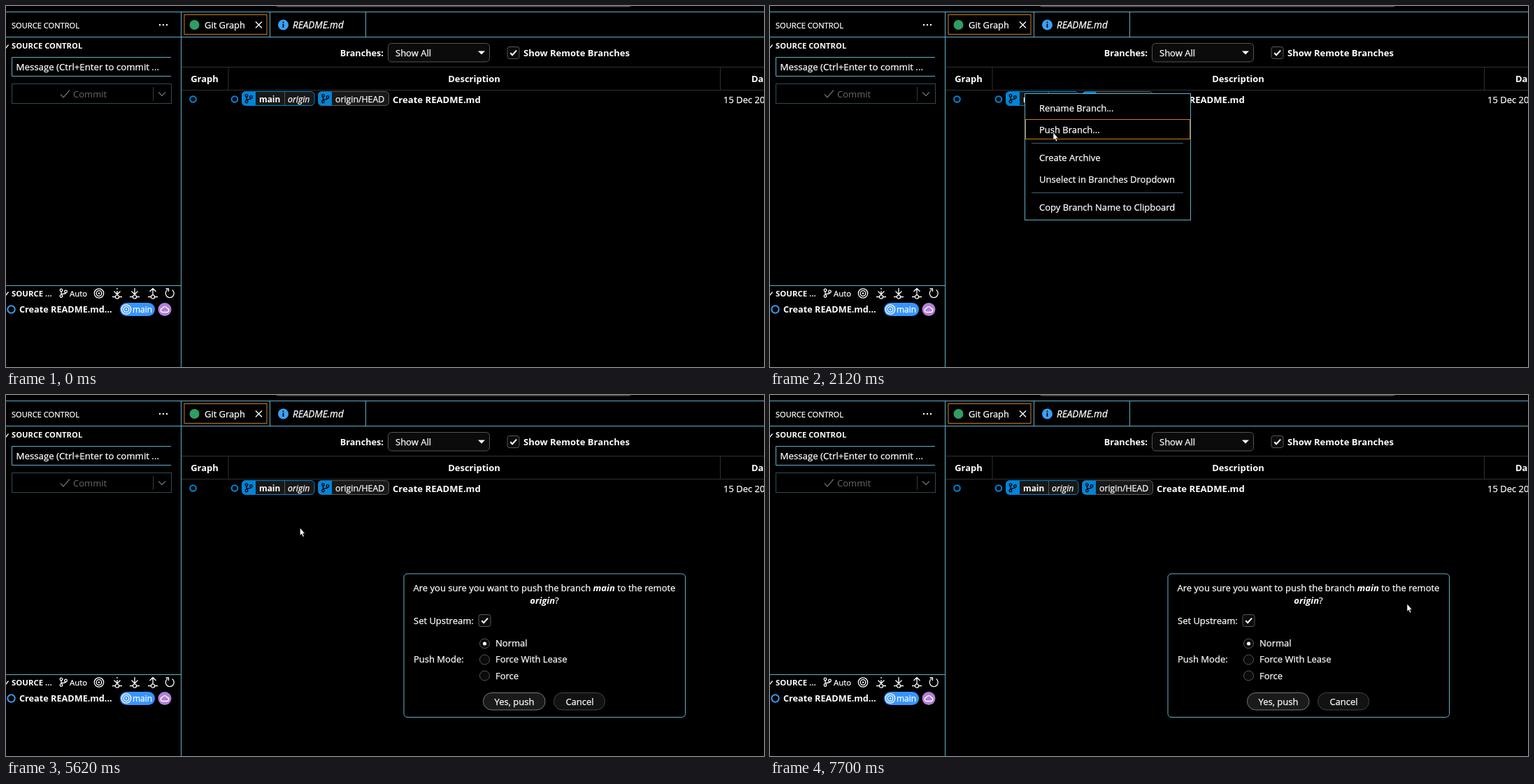
Recreate the animation shown at these times as an HTML page. Size 1084 by 517 pixels, loop 8 s.

```html
<!DOCTYPE html>
<html lang="en">
<head>
<meta charset="utf-8">
<title>Push branch</title>
<style>
html, body { margin: 0; width: 100%; height: 100%; overflow: hidden; background: #000; }
svg { display: block; width: 100%; height: 100%; }
text { font: 13px "Open Sans", "Noto Sans", sans-serif; fill: #fff; stroke: #fff; stroke-width: .25; white-space: pre; }
.b { font-weight: 700; stroke: none; }
.i { font-style: italic; }
.m { text-anchor: middle; }
.off { fill: #6a6a6a; stroke: none; }
.edge { fill: none; stroke: #62aec8; }
.line { fill: none; stroke: #fff; stroke-width: 1.3; }
.rule { fill: none; stroke: #303030; }
.focus { fill: none; stroke: #d07a1e; }
.field { fill: #0b0b0b; stroke: #555; }
.dim { fill: none; stroke: #6a6a6a; stroke-width: 1.3; }
.node { fill: none; stroke: #0085d9; stroke-width: 2; }
</style>
</head>
<body>
<svg viewBox="0 0 1084 517" xmlns="http://www.w3.org/2000/svg">
<defs>
  <g id="branch" fill="none" stroke-width="1.3">
    <circle cx="-3" cy="-4" r="1.8"/><circle cx="-3" cy="4.5" r="1.8"/><circle cx="3.5" cy="-2" r="1.8"/>
    <path d="M-3-2V2.7M3.5 0C3.5 2-3 .5-3 2.7"/>
  </g>
  <path id="tick" d="M-4.2 .3L-1.4 3.2L4.6-3.4" fill="none" stroke="#fff" stroke-width="2"/>
  <g id="check">
    <rect class="field" x="-8.5" y="-8.5" width="17" height="17" rx="3"/><use href="#tick"/>
  </g>
  <g id="target" fill="none" stroke="#fff" stroke-width="1.3">
    <circle r="6.7"/><circle r="3.8"/><circle r="1.2" fill="#fff" stroke="none"/>
  </g>
  <g id="stop" class="line"><circle cy="5" r="2.6"/><path d="M-7 5H-2.6M2.6 5H7"/></g>
</defs>

<!-- window frame -->
<rect x="384.5" y="-20" width="511" height="20.8" rx="5" fill="none" stroke="#777"/>
<path class="edge" d="M0 8.5H1084M0 44.5H1084M250.5 8V517M377.5 8V44M514.5 8V44M0 400.5H250"/>

<!-- side bar -->
<text x="8" y="31.5" style="font-size:11.1px">SOURCE CONTROL</text>
<g fill="#fff"><circle cx="220" cy="27" r="1.2"/><circle cx="225" cy="27" r="1.2"/><circle cx="230" cy="27" r="1.2"/></g>
<path class="line" d="M-1 59L0 60L3.5 55.5M-1 413L0 414L3.5 409.5"/>
<text class="b" x="8" y="61" style="font-size:11.2px">SOURCE CONTROL</text>
<path class="edge" d="M236 73.5H8.5V100.5H236"/>
<text x="14.5" y="92" style="font-size:13.25px">Message (Ctrl+Enter to commit ...</text>
<rect x="8.5" y="111.5" width="228" height="28" fill="none" stroke="#2c4b55"/>
<path d="M210.5 116V136" stroke="#3a3a3a"/>
<path class="dim" d="M78 126.5L82 131L91 120.5M218 123.5L223 128.5L228 123.5"/>
<text class="off" x="96" y="131">Commit</text>

<text class="b" x="8" y="415.5" style="font-size:11.4px">SOURCE ...</text>
<use href="#branch" x="82" y="411" stroke="#fff"/>
<text x="91" y="415.5" style="font-size:11.4px">Auto</text>
<use href="#target" x="133" y="411.5"/>
<use href="#stop" x="159" y="411.5"/><use href="#stop" x="184" y="411.5"/><use href="#stop" x="210" y="411.5"/>
<path class="line" d="M159 404V406M159 408V413M154.5 408.5L159 413L163.5 408.5M184 404V413M179.5 408.5L184 413L188.5 408.5M210 414V404.5M205.5 409L210 404.5L214.5 409"/>
<path class="line" d="M231 406.5A6 6 0 1 0 237.5 406.5M228.5 405H232.5V409"/>
<circle cx="7.5" cy="434.5" r="5.2" fill="none" stroke="#3b9af0" stroke-width="2"/>
<text class="b" x="19" y="439" style="font-size:12.7px">Create README.md...</text>
<rect x="163" y="425" width="50" height="19" rx="9.5" fill="#3794ff"/>
<use href="#target" x="172" y="434.5"/>
<text x="181" y="439" style="font-size:11.9px">main</text>
<circle cx="227" cy="434.5" r="9.5" fill="#b180d7"/>
<path class="line" d="M223.5 438.5A2.8 2.8 0 0 1 223.5 433A3.8 3.8 0 0 1 230.5 433A2.8 2.8 0 0 1 230.5 438.5Z"/>

<!-- tabs -->
<rect class="focus" x="255" y="12.5" width="118" height="28"/>
<circle cx="269.5" cy="27" r="7" fill="#2f9e62"/>
<text x="284" y="32" style="font-size:12.9px">Git Graph</text>
<path class="line" d="M357 22.5L366 31.5M366 22.5L357 31.5"/>
<circle cx="396.5" cy="27" r="7.5" fill="#3ba0f5"/>
<path d="M396.5 25.5V31M396.5 22.5V24.2" stroke="#000" stroke-width="1.7"/>
<text class="i" x="410" y="32" style="font-size:13.6px">README.md</text>

<!-- toolbar and table -->
<text class="b" x="540" y="72" text-anchor="end" style="font-size:12.7px">Branches:</text>
<rect class="field" x="546.5" y="53.5" width="145" height="26.5" rx="5"/>
<text x="557" y="72">Show All</text>
<path d="M675 64.5H685L680 69.5Z" fill="#fff"/>
<use href="#check" x="725.5" y="67"/>
<text class="b" x="740" y="72">Show Remote Branches</text>
<path class="rule" d="M251 87.5H1084M251 120.5H1084M318 88V120M1021.5 88V120"/>
<text class="b m" x="284" y="109">Graph</text>
<text class="b m" x="669.5" y="109">Description</text>
<text class="b" x="1066" y="109">Date</text>

<rect id="row" x="251" y="121" width="833" height="25" fill="#141414"/>
<circle class="node" cx="267.5" cy="133.5" r="4.3"/>
<circle class="node" cx="327" cy="133.5" r="4.3"/>
<rect x="337.5" y="122.5" width="103.5" height="20" rx="5" fill="#181818" stroke="#0085d9"/>
<path d="M357 122.5H342.5a5 5 0 0 0-5 5V137.5a5 5 0 0 0 5 5H357Z" fill="#0085d9"/>
<use href="#branch" x="347" y="132.5" stroke="#000"/>
<path d="M398.5 123V142" stroke="#555"/>
<text class="b" x="362" y="137.5" style="font-size:11.9px">main</text>
<text class="i" x="403" y="137.5" style="font-size:12.4px">origin</text>
<rect x="446.5" y="122.5" width="101" height="20" rx="5" fill="#181818" stroke="#5c5c5c"/>
<path d="M466 122.5H451.5a5 5 0 0 0-5 5V137.5a5 5 0 0 0 5 5H466Z" fill="#0085d9"/>
<use href="#branch" x="456.5" y="132.5" stroke="#000"/>
<text x="471" y="137.5" style="font-size:12.3px">origin/HEAD</text>
<text class="b" x="553" y="138.5" style="font-size:13.1px">Create README.md</text>
<text x="1026" y="138.5">15 Dec 2024</text>

<!-- context menu -->
<g id="menu">
  <rect x="364.5" y="125.5" width="237" height="181" fill="#000" stroke="#62aec8"/>
  <path d="M374 196.5H591M374 267.5H591" stroke="#3a6675"/>
  <rect id="item" class="focus" x="365.5" width="235" height="28"/>
  <text x="385" y="151">Rename Branch...</text>
  <text x="385" y="182">Push Branch...</text>
  <text x="385" y="222">Create Archive</text>
  <text x="385" y="253">Unselect in Branches Dropdown</text>
  <text x="385" y="293">Copy Branch Name to Clipboard</text>
</g>

<!-- push dialog -->
<g id="dialog">
  <rect x="569" y="256" width="402.5" height="205.5" rx="5" fill="#000" stroke="#62aec8"/>
  <text class="m" x="770" y="281">Are you sure you want to push the branch <tspan class="b i">main</tspan> to the remote</text>
  <text class="m" x="770" y="299"><tspan class="b i">origin</tspan>?</text>
  <text x="583" y="328">Set Upstream:</text>
  <use href="#check" x="684.5" y="323"/>
  <text x="583" y="383">Push Mode:</text>
  <g class="field"><circle cx="684.5" cy="356" r="7"/><circle cx="684.5" cy="379" r="7"/><circle cx="684.5" cy="402" r="7"/></g>
  <circle cx="684.5" cy="356" r="2.6" fill="#fff"/>
  <text x="700" y="360">Normal</text>
  <text x="700" y="383">Force With Lease</text>
  <text x="700" y="406.5">Force</text>
  <rect x="682.5" y="426.5" width="88.5" height="24.5" rx="12" fill="#1a1a1a" stroke="#777"/>
  <rect x="783.5" y="426.5" width="73" height="24.5" rx="12" fill="#121212" stroke="#444"/>
  <text class="m" x="727" y="443.5">Yes, push</text>
  <text class="m" x="820.5" y="443.5">Cancel</text>
</g>

<g id="cursor" fill="#fff" stroke="#000" stroke-width=".6">
  <path id="arrow" d="M0 0V11L2.4 8.9L4.2 13L6 12.2L4.2 8.2H7.2Z"/>
  <path id="hand" d="M-1.3 1.2Q0-.8 1.3 1.2V5.5Q2.8 4.5 3.8 6Q5.2 5.3 6 6.7Q7.8 6.3 7.8 8.5V11.5Q7.5 14 6 16.5H-.5Q-1 14-4 10.5Q-4.3 8.5-2.6 9L-1.3 10.3Z"/>
</g>
</svg>
<script>
const LOOP = 8000;
const el = id => document.getElementById(id);
const [row, menu, item, dialog, cursor, arrow, hand] =
  ["row", "menu", "item", "dialog", "cursor", "arrow", "hand"].map(el);

// Pointer moves: start, end, number of steps, path as [progress, x, y].
const moves = [
  { from: 70, to: 710, n: 11, path: [[0, 482, 545], [.1, 478, 500], [.3, 455, 320], [.55, 429, 153], [.82, 387, 138], [1, 366, 128]] },
  { from: 1780, to: 2120, n: 6, path: [[0, 366, 128], [.5, 382, 153], [.8, 400, 175], [1, 405, 181]] },
  { from: 5620, to: 6380, n: 12, path: [[0, 405, 181], [.2, 442, 203], [.5, 570, 284], [.75, 665, 342], [.92, 700.5, 358.5], [1, 710, 348]] },
  { from: 6450, to: 6890, n: 7, path: [[0, 710, 348], [.5, 738, 318], [.8, 766, 296], [1, 777, 289]] },
  { from: 7150, to: 7700, n: 9, path: [[0, 777, 289], [.25, 802, 302], [.55, 856, 308], [.8, 896, 303], [1, 911, 299]] }
];

// Index of the current step in a stepped change, 1..n.
const step = (t, from, to, n) =>
  Math.min(n, Math.floor((t - from) / (to - from) * (n - 1) + .25) + 1);

function along(path, p) {
  const i = Math.max(1, path.findIndex(k => k[0] >= p));
  const [p0, x0, y0] = path[i - 1], [p1, x1, y1] = path[i];
  const f = (p - p0) / (p1 - p0);
  return [x0 + (x1 - x0) * f, y0 + (y1 - y0) * f];
}

function pointer(t) {
  const m = moves.filter(m => t >= m.from).pop();
  return m && along(m.path, step(t, m.from, m.to, m.n) / m.n);
}

const fade = (t, from, to) => t < from ? 0 : [.25, .7, 1][step(t, from, to, 3) - 1];
const show = (node, on) => node.setAttribute("visibility", on ? "inherit" : "hidden");

function draw(t) {
  const pos = pointer(t), [x, y] = pos || [-50, -50];
  const menuOpen = t >= 1040 && t < 3970;
  const inRange = (a, b) => y >= a && y < b;
  const overLabel = t > 5620 && x > 676 && x < 746 && inRange(346, 367);

  cursor.setAttribute("transform", `translate(${x.toFixed(1)} ${y.toFixed(1)})`);
  show(cursor, pos);
  show(arrow, !overLabel);
  show(hand, overLabel);

  show(row, t < 1040 && inRange(121, 146));
  menu.setAttribute("opacity", menuOpen ? fade(t, 1040, 1240) : 0);
  show(item, menuOpen && inRange(131, 191));
  item.setAttribute("y", y < 161 ? 131.5 : 162.5);
  dialog.setAttribute("opacity", fade(t, 3970, 4170));
}

const begin = performance.now();
function tick() {
  draw((performance.now() - begin) % LOOP);
  requestAnimationFrame(tick);
}
tick();
</script>
</body>
</html>
```
